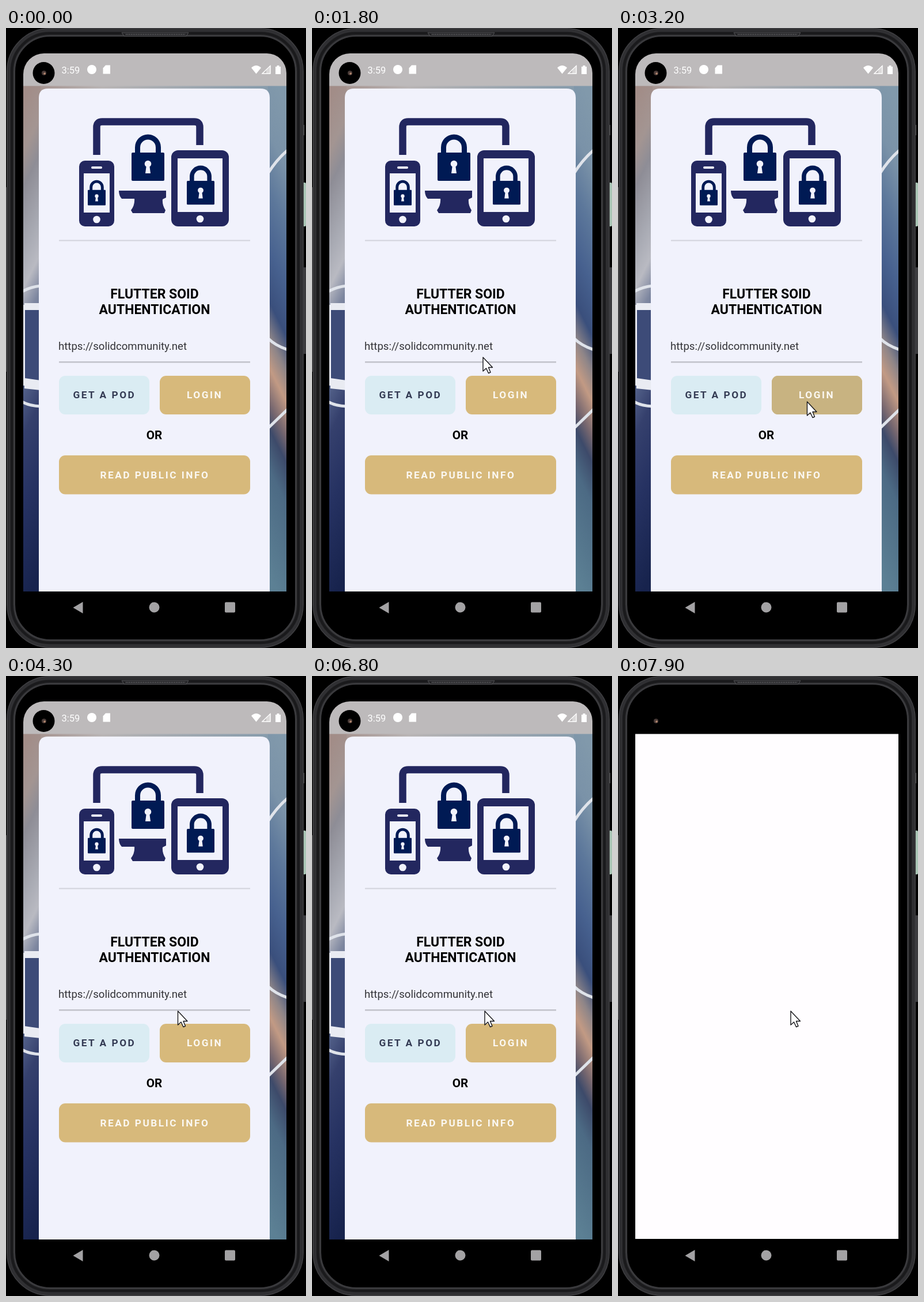
Write an HTML page that moves like this. It is 521 px wide and 1075 px high and loops after 8 s.

```html
<!DOCTYPE html>
<html lang="en">
<head>
<meta charset="utf-8">
<title>Login screen</title>
<style>
html, body { margin: 0; width: 100%; height: 100%; overflow: hidden; background: #000; }
svg { display: block; width: 100%; height: 100%; font-family: Roboto, sans-serif; }
.bold { font-weight: 700; }
.title { font-size: 23px; text-anchor: middle; }
.label { font-size: 17.25px; letter-spacing: 2.5px; fill: #fbf8f2; }
</style>
</head>
<body>
<svg viewBox="0 0 521 1075">
  <defs>
    <linearGradient id="leftPhoto" gradientUnits="userSpaceOnUse" x1="43" y1="100" x2="394" y2="275">
      <stop offset="0" stop-color="#a28d88"/>
      <stop offset=".1" stop-color="#a39592"/>
      <stop offset=".17" stop-color="#8e8d96"/>
      <stop offset=".3" stop-color="#a9abb4"/>
      <stop offset=".37" stop-color="#b9bac2"/>
      <stop offset=".44" stop-color="#7e87a0"/>
      <stop offset=".56" stop-color="#56648c"/>
      <stop offset=".66" stop-color="#35406d"/>
      <stop offset=".8" stop-color="#263262"/>
      <stop offset="1" stop-color="#17234d"/>
    </linearGradient>
    <linearGradient id="rightPhoto" gradientUnits="userSpaceOnUse" x1="472" y1="100" x2="121" y2="275">
      <stop offset="0" stop-color="#8199ab"/>
      <stop offset=".13" stop-color="#7a92a8"/>
      <stop offset=".24" stop-color="#5d789b"/>
      <stop offset=".36" stop-color="#47618f"/>
      <stop offset=".46" stop-color="#3a4f7c"/>
      <stop offset=".53" stop-color="#8e8588"/>
      <stop offset=".59" stop-color="#c29a84"/>
      <stop offset=".66" stop-color="#77676f"/>
      <stop offset=".71" stop-color="#3d4a6a"/>
      <stop offset=".79" stop-color="#4c6a84"/>
      <stop offset="1" stop-color="#5c8094"/>
    </linearGradient>
    <linearGradient id="topPhoto">
      <stop offset="0" stop-color="#a28d88"/>
      <stop offset=".3" stop-color="#b9b5b5"/>
      <stop offset="1" stop-color="#8199ab"/>
    </linearGradient>
    <clipPath id="screen"><path d="M30 977V80A36 36 0 0 1 66 44H453A34 34 0 0 1 487 78V977Z"/></clipPath>
    <g id="lock">
      <path d="M10.5 34V22a18 18 0 0 1 36 0V34" fill="none" stroke="#001a54" stroke-width="9"/>
      <rect y="31" width="57" height="49" rx="2" fill="#001a54"/>
      <path d="M26 52h5l2 15h-9z" fill="#f1f2fc"/>
      <circle cx="28.5" cy="50.5" r="5.8" fill="#f1f2fc"/>
    </g>
  </defs>

  <!-- phone body -->
  <rect y="276" width="4" height="320" fill="#4b4b4d"/>
  <rect x="514" y="415" width="7" height="150" fill="#3c3c3f"/>
  <rect x="515" y="268" width="6" height="76" rx="2" fill="#a9c5b5"/>
  <rect x="514" y="168" width="4" height="18" fill="#555"/>
  <g fill="none">
    <rect x="2" y="1" width="514" height="1073" rx="74" fill="#242426" stroke="#3c3c3f" stroke-width="2"/>
    <rect x="5.5" y="4.5" width="507" height="1066" rx="70" stroke="#303033" stroke-width="4"/>
    <rect x="10" y="9" width="498" height="1057" rx="66" stroke="#1a1a1c" stroke-width="4"/>
    <rect x="14.5" y="13.5" width="489" height="1048" rx="62" fill="#000" stroke="#3a3a3d" stroke-width="3"/>
  </g>
  <path d="M201 8H317L313 14H205Z" fill="#242426" stroke="#555558"/>
  <path d="M208 11H311" stroke="#66666a" stroke-width="2" stroke-dasharray="1.5 1.5"/>

  <g id="app">
    <g clip-path="url(#screen)">
      <!-- blurred photo edges -->
      <rect x="30" y="100" width="457" height="10" fill="url(#topPhoto)"/>
      <rect x="30" y="100" width="30" height="877" fill="url(#leftPhoto)"/>
      <rect x="455" y="100" width="32" height="877" fill="url(#rightPhoto)"/>
      <g fill="none" stroke="#dfe3ea" stroke-width="5">
        <path d="M455 252Q470 228 490 211"/>
        <path d="M455 538Q468 551 490 558"/>
        <path d="M455 694L490 660"/>
        <path d="M28 457Q42 449 60 447"/>
        <path d="M28 648Q40 655 60 656"/>
      </g>
      <rect x="32" y="488" width="28" height="122" fill="#3d4b78"/>
      <path d="M60 482H31V618H60" fill="none" stroke="#e9ebf2" stroke-width="4"/>
      <path d="M32 477H60V489H32ZM32 607L60 611V628L32 625Z" fill="#e9ebf2"/>
      <rect x="30" y="44" width="457" height="56.5" fill="#bdbabb"/>

      <!-- card -->
      <path d="M57 977V121Q57 105 73 105H442Q458 105 458 121V977Z" fill="#f1f2fc"/>
    </g>

    <!-- status bar -->
    <circle cx="65.5" cy="78" r="19" fill="#000"/>
    <g fill="#fff">
      <text x="96.5" y="78.5" font-size="16.5">3:59</text>
      <circle cx="149" cy="72" r="8"/>
      <path d="M173 64.5H181V79.5H168.5V69.5Z"/>
      <path d="M426 69Q434.5 61 443 69L434.5 79.5Z"/>
      <path d="M452 73L459.5 65.5V79H452Z" opacity=".45"/>
      <path d="M445 79L459 65.5V79Z" fill="none" stroke="#fff" stroke-width="1.3"/>
      <path d="M468 67H470.5V65H474.5V67H477V80H468Z"/>
    </g>

    <!-- devices -->
    <g fill="#23275f">
      <path d="M157.5 220V172Q157.5 162.5 167 162.5H327Q336.5 162.5 336.5 172V203" fill="none" stroke="#23275f" stroke-width="12.5"/>
      <path d="M196 282H278V294L272 297Q271 307 277 316L275 321H220L217 316Q224 307 223 296H201Q196 291 196 282Z"/>
      <rect x="127" y="230" width="61" height="114" rx="10"/>
      <rect x="287" y="212" width="100" height="132" rx="12"/>
    </g>
    <g fill="#f1f2fc">
      <rect x="135" y="252" width="45" height="68"/>
      <rect x="148" y="240" width="19" height="4" rx="2"/>
      <circle cx="157.5" cy="332" r="6.3"/>
      <rect x="298" y="226" width="78" height="93"/>
      <circle cx="337" cy="331" r="6.3"/>
    </g>
    <use href="#lock" transform="translate(218 185)"/>
    <use href="#lock" transform="translate(314 239) scale(.842)"/>
    <use href="#lock" transform="translate(142 264) scale(.544)"/>

    <!-- form -->
    <rect x="92" y="367.5" width="332" height="2" fill="#d2d3dc"/>
    <text class="bold title" x="258" y="469">FLUTTER SOID</text>
    <text class="bold title" x="258" y="496">AUTHENTICATION</text>
    <text x="91" y="558" font-size="18.6" fill="#343438">https://solidcommunity.net</text>
    <rect x="92" y="578" width="332" height="2.5" fill="#c1c2ca"/>
    <rect x="92" y="603" width="157" height="67" rx="11" fill="#daecf3"/>
    <rect x="267" y="603" width="157" height="67" rx="11" fill="#d7b97b"/>
    <rect id="press" x="267" y="603" width="157" height="67" rx="11" fill="#c8b381"/>
    <rect x="92" y="741" width="332" height="67.5" rx="11" fill="#d7b97b"/>
    <text class="bold label" x="116.5" y="642" style="fill:#343b54">GET A POD</text>
    <text class="bold label" x="314" y="642">LOGIN</text>
    <text class="bold" x="257.5" y="713" font-size="20.7" text-anchor="middle">OR</text>
    <text class="bold label" x="163.5" y="780.5">READ PUBLIC INFO</text>
  </g>

  <!-- page that opens after login -->
  <g id="page">
    <rect x="29" y="43" width="459" height="58" fill="#000"/>
    <rect x="30" y="100.5" width="457" height="875.5" fill="#fffdff"/>
    <rect x="29" y="976" width="459" height="2" fill="#000"/>
  </g>

  <circle cx="66" cy="78" r="4" fill="#4a3b38"/>
  <circle cx="67" cy="79" r="1.8" fill="#b88b70"/>
  <g fill="#a3a2a4">
    <path d="M116.5 1005L133.5 995V1015Z"/>
    <circle cx="257.5" cy="1004.5" r="9"/>
    <rect x="380" y="995.5" width="18" height="18" rx="2"/>
  </g>
  <path id="cursor" d="M.5 1V25L6 20L10 28.5L13.5 27L10 18.5H17Z" fill="#fff" stroke="#16161a" stroke-width="1.4" stroke-linejoin="round"/>
</svg>
<script>
const $ = id => document.getElementById(id);
const LOOP = 8000, STEP = 100;

// pointer stops: time, x, y
const stops = [
  [100, 108, 650], [900, 290, 576], [1800, 296.5, 570], [2200, 297, 571],
  [2900, 328, 647], [3500, 328, 647], [3900, 279, 598], [4200, 298, 580],
  [5600, 298, 580], [5900, 299.5, 580], [LOOP, 299.5, 580]
];

const clamp = v => Math.max(0, Math.min(1, v));
const ramp = (t, from, to) => clamp((t - from) / (to - from));
const ease = p => p * p * (3 - 2 * p);

function pointerAt(t) {
  const i = Math.max(1, stops.findIndex(s => s[0] > t));
  const [t0, x0, y0] = stops[i - 1], [t1, x1, y1] = stops[i];
  const p = ease(ramp(t, t0, t1));
  return [x0 + (x1 - x0) * p, y0 + (y1 - y0) * p];
}

function draw(now) {
  const t = Math.floor(now % LOOP / STEP) * STEP;
  $("cursor").setAttribute("transform", `translate(${pointerAt(t)})`);
  $("cursor").style.opacity = t < 100 ? 0 : 1;
  $("press").style.opacity = ramp(t, 2900, 3100) * (1 - ramp(t, 3300, 3600));
  $("page").style.opacity = ramp(t, 7600, 7900);
  requestAnimationFrame(draw);
}
draw(performance.now());
</script>
</body>
</html>
```
